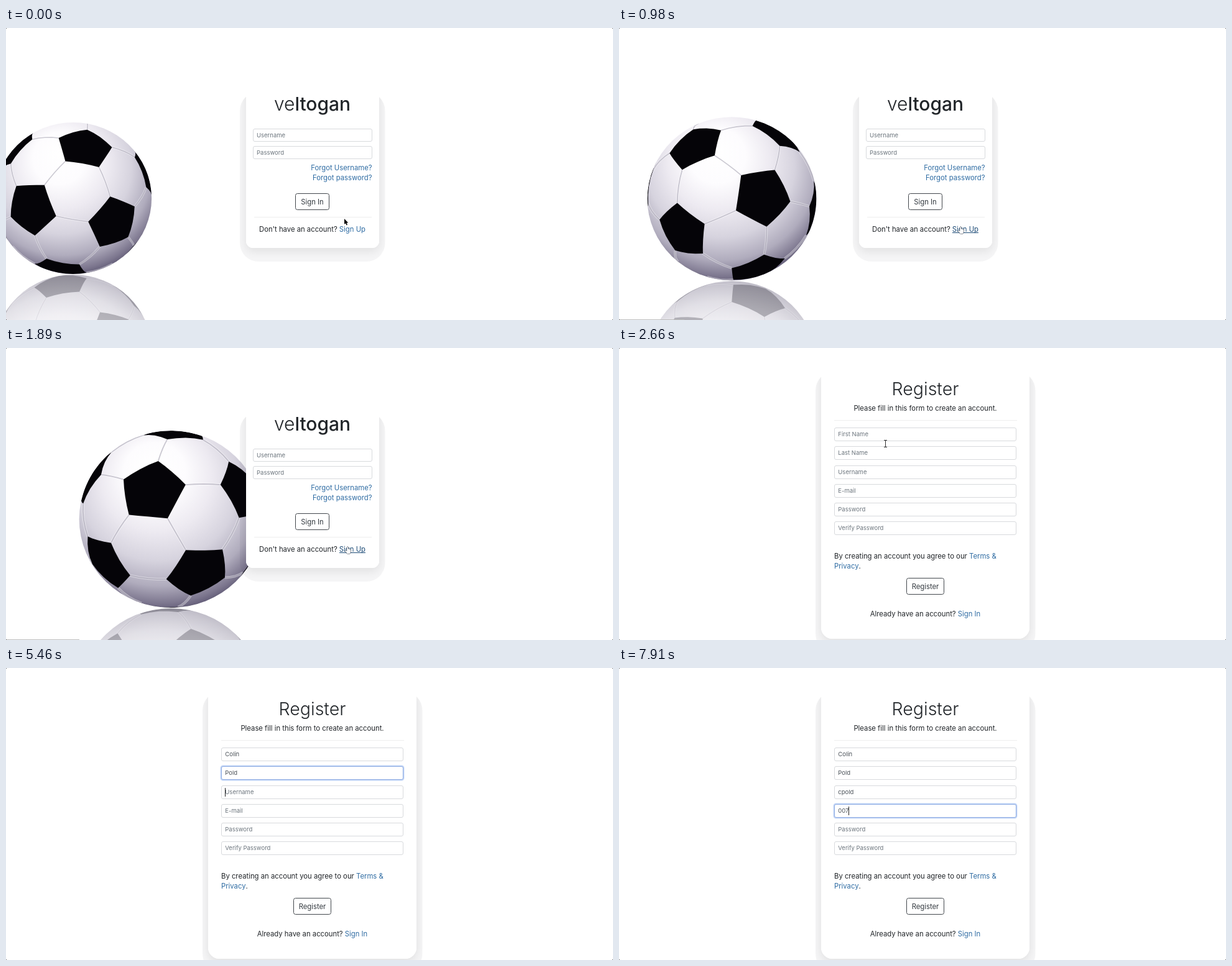
Write an HTML page with a canvas that moves like this. It is 976x470 px and loops after 8 s.

```html
<!DOCTYPE html>
<html lang="en">
<head>
<meta charset="utf-8">
<title>Sign in and register</title>
<style>
  html, body { margin: 0; width: 100%; height: 100%; overflow: hidden; background: #fff; }
  canvas { display: block; }
</style>
</head>
<body>
<canvas id="stage" width="976" height="470"></canvas>
<script>
const ctx = document.getElementById('stage').getContext('2d');
const LOOP = 8000, STEP = 70, PAGE_SWITCH = 2310;
const INK = '#212529', LINK = '#2f6ca3', LINK_HOVER = '#1f4d78', MUTED = '#6c757d';
const font = (size, weight = 400) => `${weight} ${size}px Inter, "Open Sans", sans-serif`;
const BODY = font(11.3), FIELD = font(9.5);
const clamp = v => Math.max(0, Math.min(1, v));
const mix = (a, b, k) => a + (b - a) * k;
const ease = k => k * k * (3 - 2 * k);

// ---------- vectors ----------
const dot = (a, b) => a[0] * b[0] + a[1] * b[1] + a[2] * b[2];
const cross = (a, b) => [a[1] * b[2] - a[2] * b[1], a[2] * b[0] - a[0] * b[2], a[0] * b[1] - a[1] * b[0]];
const blend = (a, p, b, q) => a.map((v, i) => v * p + b[i] * q);
const unit = a => a.map(v => v / Math.hypot(...a));
function rotate(v, axis, angle) {
  const c = Math.cos(angle), s = Math.sin(angle);
  return blend(blend(v, c, cross(axis, v), s), 1, axis, dot(axis, v) * (1 - c));
}

// ---------- ball: truncated icosahedron, x right, y down, z to the viewer ----------
const SPIN_AXIS = unit([-0.83, 0.095, 0.55]);
const CAMERA = 15, RIM = 1 / CAMERA;
const PATCH = 1.95; // below 2 widens the pentagons
const poleA = unit([0.147, -0.67, 0.728]);
const poleB = unit([-0.52, 0.116, 0.846]);
const side = unit(blend(poleB, 1, poleA, -dot(poleA, poleB)));
const up = cross(poleA, side);
const ring = [0, 1, 2, 3, 4].map(k => {
  const a = k * Math.PI * 0.4;
  return unit(blend(poleA, 0.5, blend(side, Math.cos(a), up, Math.sin(a)), 1));
});
const half = [poleA, ...ring];
const poles = [...half, ...half.map(v => v.map(c => -c))];
const near = v => poles.filter(w => dot(v, w) > 0.3 && dot(v, w) < 0.9);

function arc(a, b, n = 5) {
  return Array.from({ length: n }, (_, i) => unit(blend(a, 1 - i / (n - 1), b, i / (n - 1))));
}
const patches = poles.map(v => {
  const u = unit(cross(v, near(v)[0])), w = cross(v, u);
  const corners = near(v)
    .sort((a, b) => Math.atan2(dot(a, u), dot(a, w)) - Math.atan2(dot(b, u), dot(b, w)))
    .map(n => unit(blend(v, PATCH, n, 1)));
  return corners.flatMap((c, i) => arc(c, corners[(i + 1) % 5]));
});
const seams = [];
poles.forEach((v, i) => poles.forEach((w, j) => {
  if (i < j && dot(v, w) > 0.3) seams.push(arc(unit(blend(v, PATCH, w, 1)), unit(blend(v, 1, w, PATCH))));
}));

// Perspective projection scaled so that the outline has radius 1.
function trace(points) {
  ctx.beginPath();
  for (const [x, y, z] of points) {
    const k = z < RIM ? 1 / Math.hypot(x, y) : Math.sqrt(CAMERA * CAMERA - 1) / (CAMERA - z);
    ctx.lineTo(x * k, y * k);
  }
}

function sphere(angle, tilt, patchColor) {
  const turn = p => rotate(rotate(p, SPIN_AXIS, angle), [1, 0, 0], tilt);
  const hidden = p => p.every(q => q[2] < RIM);
  ctx.beginPath();
  ctx.arc(0, 0, 1, 0, 7);
  const g = ctx.createRadialGradient(-0.2, -0.6, 0, -0.1, -0.3, 1.35);
  [[0, '#fff'], [0.25, '#fdfcfe'], [0.45, '#edeaf1'], [0.65, '#d6d3de'], [0.82, '#b0acbd'], [0.94, '#7c768e'], [1, '#5a5470']]
    .forEach(s => g.addColorStop(...s));
  ctx.fillStyle = g;
  ctx.fill();
  ctx.save();
  ctx.clip();
  for (const seam of seams) {
    const p = seam.map(turn);
    if (hidden(p)) continue;
    trace(p);
    ctx.lineWidth = 0.028;
    ctx.strokeStyle = 'rgba(255,255,255,.4)';
    ctx.stroke();
    ctx.lineWidth = 0.013;
    ctx.strokeStyle = 'rgba(140,135,155,.45)';
    ctx.stroke();
  }
  ctx.fillStyle = patchColor;
  for (const patch of patches) {
    const p = patch.map(turn);
    if (hidden(p)) continue;
    trace(p);
    ctx.fill();
  }
  ctx.restore();
}

function ball(s) {
  const x = 108 + 66.3 * s + 8.87 * s * s;
  const y = 274 + 0.8 * s;
  const r = 122 + 8.45 * s + 1.27 * s * s;
  const angle = (44 * s - 0.55 * s * s) * Math.PI / 180;
  const place = (cy, flip, tilt, patchColor) => {
    ctx.save();
    ctx.translate(x, cy);
    ctx.scale(r * 1.034, r * flip);
    sphere(angle, tilt, patchColor);
    ctx.restore();
  };
  const floor = y + r + 1;
  ctx.save();
  ctx.globalAlpha = 0.42;
  place(floor + r, -1, 0.17, '#454350');
  ctx.restore();
  const fade = ctx.createLinearGradient(0, floor, 0, floor + 130);
  fade.addColorStop(0, 'rgba(255,255,255,0)');
  fade.addColorStop(1, 'rgba(255,255,255,.35)');
  ctx.fillStyle = fade;
  ctx.fillRect(0, floor, 600, 470 - floor);
  place(y, 1, 0, '#050408');
}

// ---------- interface helpers ----------
function box(x, y, w, h, r) {
  ctx.beginPath();
  ctx.roundRect(x, y, w, h, r);
}

function text(str, x, y, { f = BODY, color = INK, align = 'left' } = {}) {
  ctx.font = f;
  ctx.fillStyle = color;
  ctx.textAlign = align;
  ctx.fillText(str, x, y);
}

// Draws [string, color, font] pieces as one centred line and returns where each starts.
function centred(pieces, cx, y) {
  const widths = pieces.map(([s, , f = BODY]) => (ctx.font = f, ctx.measureText(s).width));
  let x = cx - widths.reduce((a, b) => a + b) / 2;
  return pieces.map(([s, color, f = BODY], i) => {
    text(s, x, y, { f, color });
    const span = { x, w: widths[i] };
    x += widths[i];
    return span;
  });
}

function card(x, y, w, h, r, band) {
  ctx.save();
  box(...band, 30);
  ctx.fillStyle = 'rgba(20,20,30,.035)';
  ctx.fill();
  ctx.clip();
  ctx.shadowColor = 'rgba(0,0,0,.09)';
  ctx.shadowBlur = 15;
  ctx.shadowOffsetY = 5;
  box(x, y, w, h, r);
  ctx.fillStyle = '#fff';
  ctx.fill();
  ctx.restore();
  box(x, y, w, h, r);
  ctx.fillStyle = '#fff';
  ctx.fill();
}

function rule(x1, x2, y) {
  ctx.fillStyle = '#eee';
  ctx.fillRect(x1, y, x2 - x1, 1);
}

function field(x, y, w, h, focus = 0) {
  box(x, y, w, h, 2.5);
  if (focus > 0) {
    ctx.strokeStyle = `rgba(100,150,235,${0.38 * focus})`;
    ctx.lineWidth = 4;
    ctx.stroke();
  }
  ctx.fillStyle = '#fff';
  ctx.fill();
  ctx.lineWidth = 1;
  ctx.strokeStyle = `rgb(${mix(216, 140, focus)},${mix(218, 170, focus)},${mix(221, 226, focus)})`;
  ctx.stroke();
}

function button(label, x, y, w, h) {
  box(x, y, w, h, 3);
  ctx.strokeStyle = '#42474c';
  ctx.lineWidth = 1;
  ctx.stroke();
  text(label, x + w / 2, y + 17, { color: '#343a40', align: 'center' });
}

// ---------- pointers ----------
function shape(points, x, y, fill, stroke) {
  ctx.beginPath();
  points.forEach(([px, py]) => ctx.lineTo(x + px, y + py));
  ctx.closePath();
  ctx.lineJoin = 'round';
  ctx.lineWidth = 1;
  ctx.strokeStyle = stroke;
  ctx.stroke();
  ctx.fillStyle = fill;
  ctx.fill();
}
const ARROW = [[0, 0], [0, 9], [2, 7.2], [3.5, 10.5], [5, 9.8], [3.6, 6.7], [6.2, 6.5]];
const HAND = [[-1.5, -5], [0, -5], [0.6, -1.5], [4.2, -0.5], [4.5, 2], [3.2, 6], [-1.5, 6], [-4.5, 1.8], [-3.6, 0.8], [-1.8, 2]];

function beam(x, y) {
  ctx.fillStyle = '#333';
  ctx.fillRect(x, y - 5, 1, 10);
  ctx.fillRect(x - 2, y - 6, 5, 1);
  ctx.fillRect(x - 2, y + 5, 5, 1);
}

// ---------- pages ----------
function loginPage(t) {
  ball(t / 1000);
  card(386, 88, 214, 266, 11, [376, 103, 233.5, 273]);
  centred([['ve', INK, font(30, 300)], ['ltogan', INK, font(30, 500)]], 492.5, 132.5);
  [['Username', 162.5], ['Password', 190.5]].forEach(([label, y]) => {
    field(397.5, y, 191, 20);
    text(label, 403, y + 13.5, { f: FIELD, color: MUTED });
  });
  text('Forgot Username?', 588.5, 228.5, { color: LINK, align: 'right' });
  text('Forgot password?', 588.5, 245, { color: LINK, align: 'right' });
  button('Sign In', 465.5, 266.5, 54, 26);
  rule(399, 588, 304);

  const hover = t >= 490 && t < 2170;
  const color = hover ? LINK_HOVER : LINK;
  const link = centred([["Don't have an account? ", INK], ['Sign Up', color]], 492.5, 327.5)[1];
  if (hover) {
    ctx.fillStyle = color;
    ctx.fillRect(link.x, 329, link.w, 1);
  }
  if (t >= 700) {
    ctx.fillStyle = '#bdbdbd';
    ctx.fillRect(0, 469, t < 1400 ? 105 : 118, 1);
  }

  const down = ease(clamp(t / 500)), away = ease(clamp((t - 2030) / 560));
  const x = mix(mix(544, 550, down), 430, away), y = mix(mix(307, 325, down), 157, away);
  if (t < 280 || t >= 2170) shape(ARROW, x, y, '#000', '#fff');
  else shape(HAND, x, y, '#fff', '#222b3a');
}

// Each entry is [time, value]; the latest one reached applies.
const FIELDS = [
  { hint: 'First Name', focus: 3080, typed: [[3290, 'C'], [3640, 'Co'], [3920, 'Col'], [3990, 'Coli'], [4130, 'Colin']] },
  { hint: 'Last Name', focus: 4410, typed: [[4760, 'P'], [4970, 'Po'], [5110, 'Pol'], [5180, 'Pold']] },
  { hint: 'Username', focus: 5460, typed: [[5880, 'c'], [6300, 'cp'], [6440, 'cpo'], [6510, 'cpol'], [6650, 'cpold']] },
  { hint: 'E-mail', focus: 6930, typed: [[7420, '0'], [7770, '00'], [7910, '007']] },
  { hint: 'Password', focus: LOOP, typed: [] },
  { hint: 'Verify Password', focus: LOOP, typed: [] }
];
const MENUS = [
  { row: 0, from: 3290, to: 3640, items: ['Cody', 'Cyril', 'Clem'] },
  { row: 0, from: 3640, to: 3920, items: ['Cody'] },
  { row: 2, from: 5880, to: 6300, items: ['cody'] }
];
const rowY = i => Math.round(128 + i * 30.25);

function menu({ row, items }) {
  const y = rowY(row) + 25.5;
  ctx.save();
  ctx.shadowColor = 'rgba(0,0,0,.32)';
  ctx.shadowBlur = 4;
  ctx.shadowOffsetY = 1;
  box(346, y, 293.5, 33 + (items.length - 1) * 23, 2);
  ctx.fillStyle = '#fff';
  ctx.fill();
  ctx.restore();
  items.forEach((s, i) => text(s, 354, y + 18.7 + i * 23, { f: '500 9.5px Roboto, sans-serif', color: '#111' }));
}

function registerPage(t) {
  card(325, 30, 335, 438, 18, [316, 38, 353.5, 452]);
  text('Register', 492.5, 75.5, { f: font(28.5, 300), align: 'center' });
  text('Please fill in this form to create an account.', 492.5, 100.5, { align: 'center' });
  rule(346, 640, 116);

  FIELDS.forEach(({ hint, focus, typed }, i) => {
    const y = rowY(i), next = FIELDS[i + 1] ? FIELDS[i + 1].focus : LOOP;
    const glow = clamp((t - focus) / 160) - clamp((t - next) / 160);
    field(346.5, y + 0.5, 292, 21, glow);
    const value = typed.filter(e => t >= e[0]).map(e => e[1]).pop() || '';
    text(value || hint, 352.3, y + 14.2, { f: FIELD, color: value ? '#495057' : MUTED });
    if (t >= focus && t < next) {
      const x = 352 + ctx.measureText(value).width;
      ctx.fillStyle = '#222';
      ctx.fillRect(Math.round(x), y + 4, 1, 14);
    }
  });
  MENUS.filter(m => t >= m.from && t < m.to).forEach(menu);

  const lead = 'By creating an account you agree to our ';
  text(lead, 346, 338.5);
  text('Terms &', 346 + ctx.measureText(lead).width, 338.5, { color: LINK });
  text('Privacy', 346, 355, { color: LINK });
  text('.', 346 + ctx.measureText('Privacy').width, 355);
  button('Register', 462.5, 370.5, 60, 26);
  centred([['Already have an account? ', INK], ['Sign In', LINK]], 492.5, 431.5);

  if (t < 2590) {
    const k = ease(clamp((t - 2030) / 560));
    shape(ARROW, mix(550, 430, k), mix(325, 157, k), '#000', '#fff');
  } else if (t < 3220) {
    const k = ease(clamp((t - 2590) / 350));
    beam(Math.round(mix(429, 420, k)), Math.round(mix(156, 139, k)));
  }
}

function windowCorners() {
  ctx.fillStyle = '#555';
  for (const x of [0, 975]) for (const y of [0, 469]) ctx.fillRect(x, y, 1, 1);
}

function draw(now) {
  const t = Math.floor((now % LOOP) / STEP) * STEP;
  ctx.fillStyle = '#fff';
  ctx.fillRect(0, 0, 976, 470);
  if (t < PAGE_SWITCH) loginPage(t);
  else registerPage(t);
  windowCorners();
}

const start = performance.now();
function tick() {
  draw(performance.now() - start);
  requestAnimationFrame(tick);
}
tick();
</script>
</body>
</html>
```
